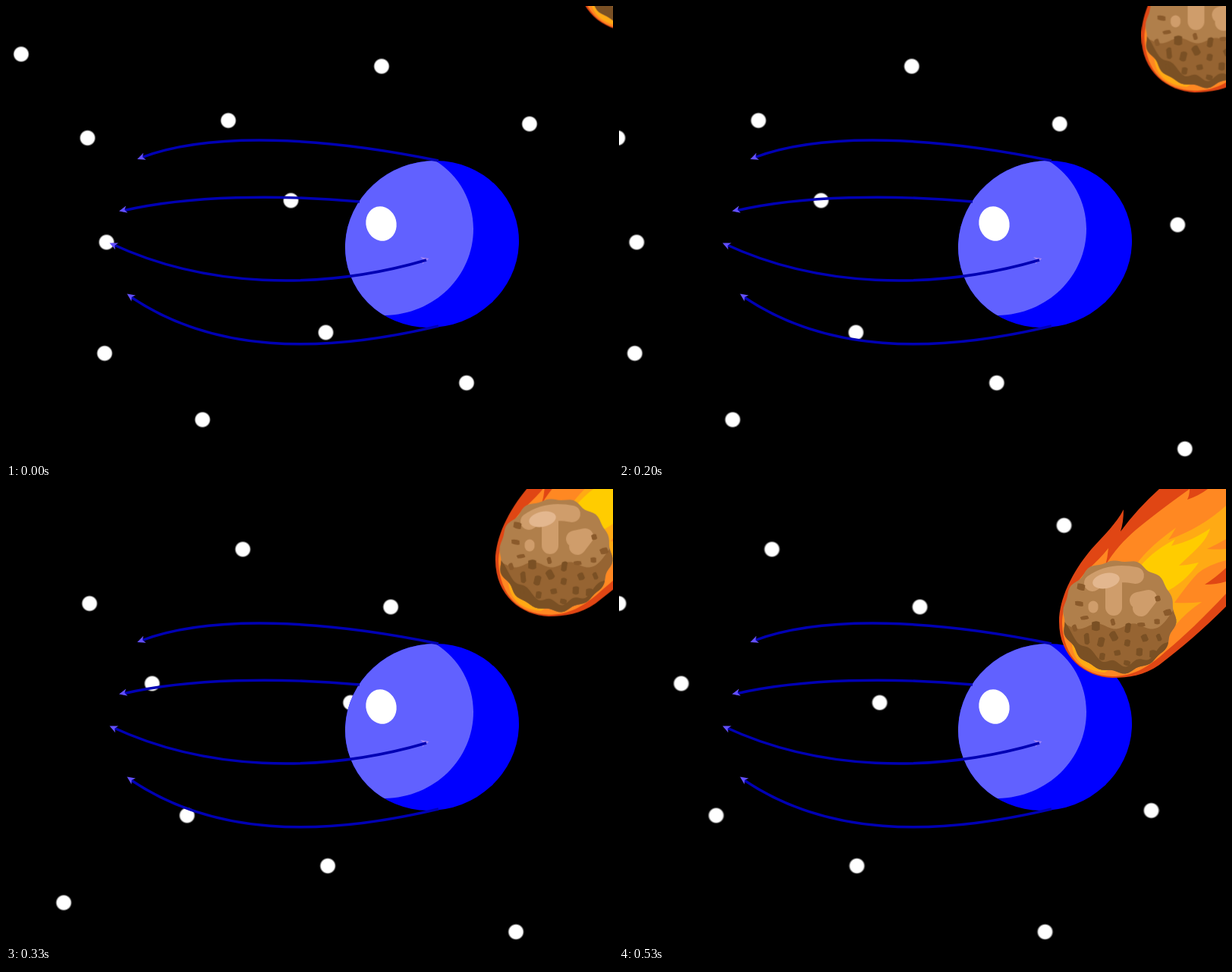
Recreate the animation shown at these times as an HTML page. Size 800x600 px, loop 0.59 s.

```html
<!DOCTYPE html>
<html lang="en">
<head>
<meta charset="utf-8">
<title>Comet and planet</title>
<style>
  html, body { margin: 0; width: 100%; height: 100%; overflow: hidden; background: #000; }
  svg { display: block; width: 100%; height: 100%; }
</style>
</head>
<body>
<svg viewBox="0 0 800 600">
  <defs>
    <radialGradient id="glow">
      <stop offset=".8" stop-color="#fff"/>
      <stop offset="1" stop-color="#fff" stop-opacity="0"/>
    </radialGradient>
    <ellipse id="globe" cx="561.5" cy="314" rx="115.3" ry="109.2" transform="rotate(-21 561.5 314)"/>
    <clipPath id="globeClip"><use href="#globe"/></clipPath>
    <clipPath id="rockClip"><path id="rockOutline"/></clipPath>
    <path id="head" d="M0 0L-10.5 -4.8L-7.5 0L-10.5 4.8Z"/>
  </defs>
  <g id="stars" fill="url(#glow)"></g>

  <use href="#globe" fill="#00f"/>
  <path clip-path="url(#globeClip)" fill="#6161ff" d="M566 204C598 224 616 258 616 294C616 356 565 407 499 408L430 430V190H566Z"/>
  <ellipse cx="494.5" cy="287" rx="20" ry="23" transform="rotate(-15 494.5 287)" fill="#fff"/>

  <use href="#head" fill="#a184f4" transform="translate(557.5 333) rotate(-15)"/>
  <g fill="none" stroke="#0000b4" stroke-width="3.4">
    <path d="M178 200C270 165 420 173 570 204"/>
    <path d="M154 270C242 249.5 360 248.5 466 258"/>
    <path d="M140 314C260 370 410 377 554 335"/>
    <path d="M165 384C272 456 410 460 570 422"/>
  </g>
  <g fill="#6450ff">
    <use href="#head" transform="translate(173 202) rotate(159)"/>
    <use href="#head" transform="translate(149 270.5) rotate(167)"/>
    <use href="#head" transform="translate(136.5 312.5) rotate(205)"/>
    <use href="#head" transform="translate(159.5 379.5) rotate(215)"/>
  </g>

  <g id="comet">
    <path fill="#e04614" d="M580 175C580 145 597 110 622 80C640 60 655 46 665 27Q665 44 661 56Q683 26 712 0L800 -70V155C770 185 742 209 712 232C692 246 672 249 650 249C615 248 580 222 580 175Z"/>
    <path fill="#ff8822" d="M584 178C584 150 600 126 618 106Q634 92 645 78Q644 90 641 101C652 82 666 67 681 54Q710 30 752 0Q752 8 749 14Q764 9 776 0L800 -15V104Q786 117 772 126Q788 126 800 122V138C770 170 745 194 722 213C695 238 675 247 650 247C612 246 586 222 584 178Z"/>
    <path fill="#ffaa14" d="M680 102C695 80 715 65 734 51Q729 60 724 67C752 57 778 42 800 22V66Q786 74 775 79Q788 80 800 79V94Q776 100 763 111Q752 122 732 150Q752 151 768 149Q748 162 733 180L640 242C612 240 598 224 597 204Z"/>
    <path fill="#ffcc00" d="M685 104C702 84 717 75 733 66L728 75C748 70 765 62 779 52C774 68 765 76 738 101Q752 100 764 97C752 114 738 128 716 138Z"/>
    <g clip-path="url(#rockClip)">
      <path fill="#b07f4b" d="M570 80H750V260H570Z"/>
      <g fill="none" stroke="#cf9d6b" stroke-width="22" stroke-linecap="round" stroke-linejoin="round">
        <path d="M624 124Q648 107 681 114M652 124V156M684 147L698 144L688 157"/>
        <path stroke-width="13" d="M625 154V157"/>
      </g>
      <ellipse cx="642" cy="121" rx="18" ry="10" transform="rotate(-12 642 121)" fill="#e3b78f"/>
      <path id="shade" fill="#966432"/>
      <path id="rim" fill="#7a5024"/>
      <g id="pits"></g>
    </g>
  </g>
</svg>
<script>
const $ = id => document.getElementById(id);
const { sin, cos, PI } = Math;

function add(parent, tag, attrs) {
  const node = document.createElementNS("http://www.w3.org/2000/svg", tag);
  for (const key in attrs) node.setAttribute(key, attrs[key]);
  parent.append(node);
}

const stars = "20,63.5 495,79.5 107.5,174 293,151 690,155.5 375.5,256.5 132.5,311.5 421.5,430.5 " +
  "130,458 259,545.5 607,497 637,281.7 845.5,288.5 855,584 995,424 880,48";
for (const star of stars.split(" ")) {
  const [cx, cy] = star.split(",");
  add($("stars"), "circle", { cx, cy, r: 10.9 });
}

const rock = { x: 659, y: 168, r: 73.5 };

// Bumpy edge
const outline = Array.from({ length: 120 }, (_, i) => {
  const a = i * PI / 60;
  const r = rock.r + 1.5 * sin(14 * a) + sin(9 * a + 1);
  return [rock.x + r * cos(a), rock.y + r * sin(a)];
});
$("rockOutline").setAttribute("d", `M${outline.join("L")}Z`);

// Shading below a wavy line
const shadeTop = x => 181 + 3.5 * cos((x - 606) * PI / 24) - 25 * Math.max(0, (x - 710) / 24) ** 2;
const rimTop = x => 231 - 45 * ((x - 665) / 72) ** 2 + 3.5 * sin(x / 5);
function fillBelow(id, top) {
  let d = "M570 260";
  for (let x = 570; x <= 750; x += 2) d += `L${x} ${top(x)}`;
  $(id).setAttribute("d", d + "V260Z");
}
fillBelow("shade", shadeTop);
fillBelow("rim", rimTop);

// Pits on a sunflower spiral, leaving the highlights clear
let seed = 7;
const random = () => (seed = seed * 16807 % 2147483647) / 2147483647;
for (let i = 1; i < 38; i++) {
  const r = 68 * Math.sqrt(i / 38);
  const x = rock.x + r * cos(i * 2.4);
  const y = rock.y + r * sin(i * 2.4);
  const low = y > shadeTop(x);
  const w = 6 + 6 * random();
  const h = low ? 6 + 11 * random() : 5 + 5 * random();
  const tilt = 50 * random() - 25;
  if (y < 167 && Math.abs(x - rock.x) < 47 || y < 115) continue;
  add($("pits"), "path", {
    fill: low ? "#7a5024" : "#8a5a2b",
    d: "M-.5 -.3Q0 -.6 .4 -.4L.5 .3Q.2 .6 -.4 .4Z",
    transform: `translate(${x} ${y}) rotate(${tilt}) scale(${w} ${h})`
  });
}

// Nine steps at 15 per second, held to hundredths
const duration = 590;
const steps = 9;
const startTime = step => Math.round(step * 100 / 15) * 10;
const travel = step => step ? 36.85 * step - 1.35 : 0;
const end = travel(steps - 1);

function play(node, place) {
  const frames = Array.from({ length: steps + 1 }, (_, i) => {
    const step = Math.min(i, steps - 1);
    const [x, y] = place(travel(step));
    return {
      offset: i < steps ? startTime(step) / duration : 1,
      easing: "step-end",
      transform: `translate(${x}px, ${y}px)`
    };
  });
  node.animate(frames, { duration, iterations: Infinity });
}

play($("stars"), d => [-d, 0]);
play($("comet"), d => [0.5886 * (end - d), -0.7346 * (end - d)]);
</script>
</body>
</html>
```
